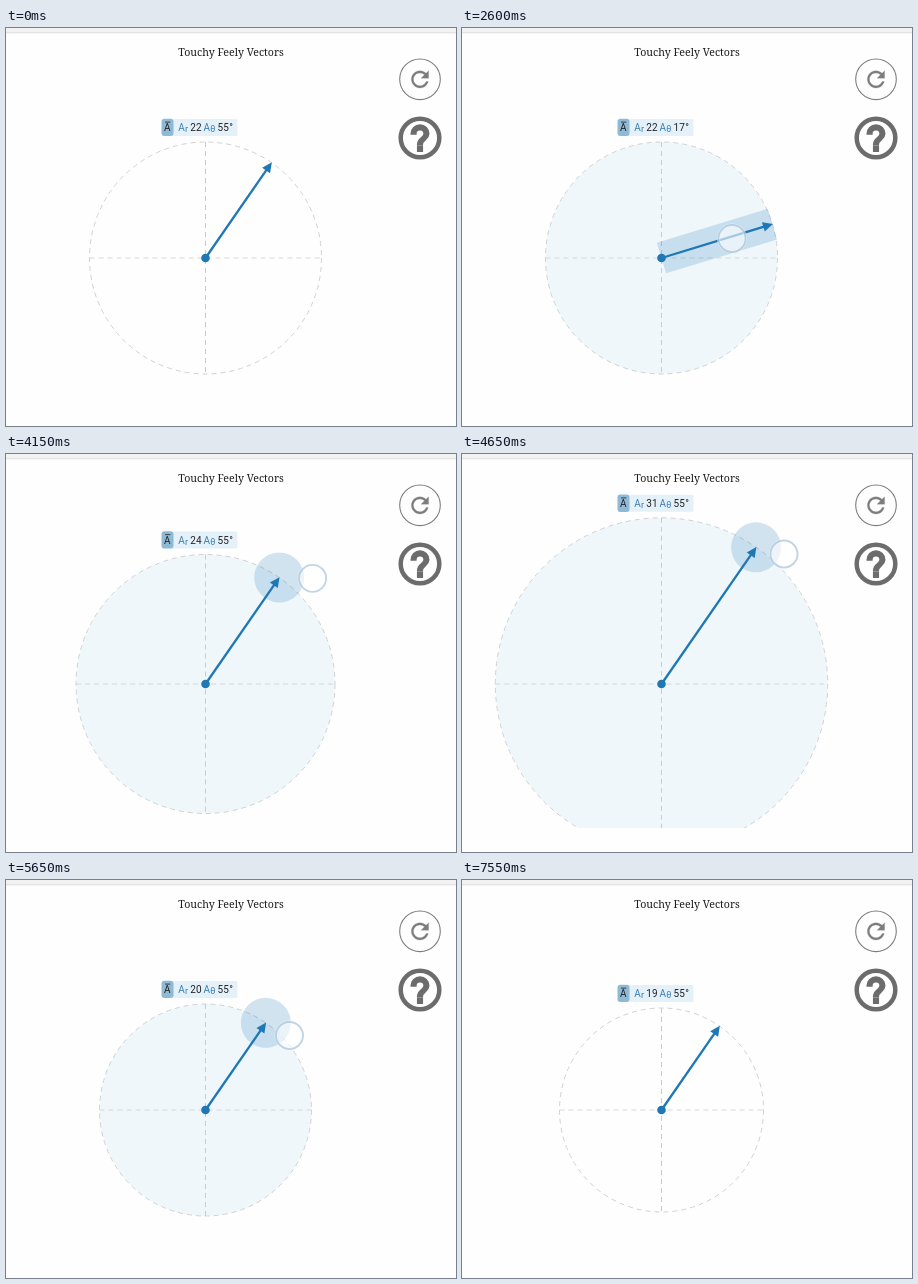
An HTML page that plays this animation: 450x398 px, repeating every 7600 ms.

```html
<!DOCTYPE html>
<html lang="en">
<head>
<meta charset="utf-8">
<title>Touchy Feely Vectors</title>
<style>
  html, body { margin: 0; width: 100%; height: 100%; overflow: hidden; background: #fefefe; }
  svg { display: block; width: 450px; height: 398px; }
  .dash { fill: none; stroke: #ccc; stroke-width: .9; stroke-dasharray: 5 4; }
  .label { font: 10px Roboto, sans-serif; letter-spacing: .15px; fill: #222; }
  .label .sym { fill: #3b7db4; }
  .label .sub { font-size: 9px; }
  .title { font: 10.6px "Noto Serif", serif; fill: #1c1c1c; text-anchor: middle; }
</style>
</head>
<body>
<svg viewBox="0 0 450 398">
  <defs><clipPath id="pad"><rect y="6" width="450" height="368"/></clipPath></defs>
  <rect width="450" height="4.5" fill="#f2f2f2"/>
  <rect y="4.3" width="450" height="1" fill="#dcdcdc"/>
  <text class="title" x="225" y="28">Touchy Feely Vectors</text>

  <g clip-path="url(#pad)">
    <g transform="translate(199.5 230)">
      <circle id="disc" fill="#1f88c4" fill-opacity=".062"/>
      <path id="across" class="dash" style="stroke: #d3d3d3"/>
      <path id="upright" class="dash" style="stroke: #c4c4c4"/>
      <circle id="rim" class="dash"/>
      <g id="spin">
        <g id="glow" fill="#1f77b4" fill-opacity=".2">
          <rect id="rod" y="-16" height="32"/>
          <circle id="tip" r="25"/>
        </g>
        <path id="shaft" stroke="#1f77b4" stroke-width="2.3"/>
        <path id="head" d="M0 0L-10 -4.8V4.8Z" fill="#1f77b4"/>
      </g>
      <circle r="4.3" fill="#1f77b4"/>
    </g>
  </g>

  <g id="label" class="label">
    <rect x="156" y="-8.5" width="75.5" height="17" rx="1.5" fill="#e5f1f9"/>
    <rect x="155.5" y="-8.7" width="12" height="17.4" rx="3" fill="#8fbad5"/>
    <text x="158.1" y="4">A</text>
    <path d="M159 -5.3H164.3" fill="none" stroke="#333" stroke-width=".9"/>
    <text class="sym" x="172.3" y="3.7">A<tspan class="sub" dy="1">r</tspan></text>
    <text id="len" x="184.3" y="3.7"></text>
    <text class="sym" x="197.6" y="3.7">A<tspan class="sub" dy="1">θ</tspan></text>
    <text id="deg" x="211.6" y="3.7"></text>
  </g>

  <g id="touch">
    <circle r="13.5" fill="#fff" fill-opacity=".6" stroke="#fff" stroke-opacity=".5" stroke-width="3"/>
    <circle r="13.5" fill="none" stroke="#86abcc" stroke-opacity=".5" stroke-width="1.9"/>
  </g>

  <circle cx="414" cy="51.3" r="20.3" fill="none" stroke="#7d7d7d" stroke-width="1.1"/>
  <path transform="translate(401 38.4) scale(1.08)" fill="#7d7d7d" stroke="#7d7d7d" stroke-width=".2" d="M17.65 6.35C16.2 4.9 14.21 4 12 4c-4.42 0-7.99 3.58-7.99 8s3.57 8 7.99 8c3.73 0 6.84-2.55 7.73-6h-2.08c-.82 2.33-3.04 4-5.65 4-3.31 0-6-2.69-6-6s2.69-6 6-6c1.66 0 3.14.69 4.22 1.78L13 11h7V4z"/>
  <circle cx="414" cy="110" r="19.3" fill="none" stroke="#6c6c6c" stroke-width="4.5"/>
  <path transform="translate(388.2 84.3) scale(2.15)" fill="#6c6c6c" stroke="#6c6c6c" stroke-width=".85" d="M11 18h2v-2h-2zM12 6c-2.21 0-4 1.79-4 4h2c0-1.1.9-2 2-2s2 .9 2 2c0 2-3 1.75-3 5h2c0-2.25 3-2.5 3-5 0-2.21-1.79-4-4-4z"/>
</svg>
<script>
const LOOP = 7600, STEP = 50, UNIT = 5.33, GRAB_TIP = 3850;

// Each row: time in ms, then values.
const ANGLE = [[1950, 55.3], [2600, 17], [2800, 11.5], [3450, 42], [3830, 55.3]];
const RADIUS = [[3850, 116], [4300, 139.8], [4650, 166.2], [4850, 174.5], [5100, 163], [5650, 106], [5900, 102]];
const TOUCH = [
  [1950, 242, 181], [2600, 270, 210.5], [2800, 271, 215], [3450, 255.5, 168.5],
  [3650, 254, 163], [3850, 291, 144], [4650, 322, 100], [4850, 325.5, 95],
  [5100, 318.5, 105], [5650, 283.5, 155.5], [5900, 282.2, 157.4]
];

const $ = id => document.getElementById(id);
const set = (id, attrs) => {
  for (const name in attrs) $(id).setAttribute(name, attrs[name]);
};

// Smooth curve through the rows, flat at peaks and at both ends.
function track(rows, t, col = 1) {
  const last = rows.length - 1;
  if (t <= rows[0][0]) return rows[0][col];
  if (t >= rows[last][0]) return rows[last][col];
  const slope = i => (rows[i + 1][col] - rows[i][col]) / (rows[i + 1][0] - rows[i][0]);
  const tangent = i => {
    if (i === 0 || i === last) return 0;
    const a = slope(i - 1), b = slope(i);
    return a * b > 0 ? 2 * a * b / (a + b) : 0;
  };
  const i = rows.findIndex(row => row[0] > t) - 1;
  const span = rows[i + 1][0] - rows[i][0];
  const u = (t - rows[i][0]) / span, v = 1 - u;
  return v * v * (1 + 2 * u) * rows[i][col] + u * u * (3 - 2 * u) * rows[i + 1][col]
    + span * u * v * (v * tangent(i) - u * tangent(i + 1));
}

const ramp = (t, start) => Math.min(1, Math.max(0, (t + STEP - start) / 400));

function draw(t) {
  const r = track(RADIUS, t), angle = track(ANGLE, t);
  const shown = ramp(t, 300) - ramp(t, 7200);
  const onTip = t >= GRAB_TIP;

  set("disc", { r, opacity: shown });
  set("rim", { r });
  set("across", { d: `M${-r} 0H${r}` });
  set("upright", { d: `M0 ${-r}V${r}` });
  set("spin", { transform: `rotate(${-angle})` });
  set("glow", { opacity: shown });
  set("rod", { width: r, visibility: onTip ? "hidden" : "visible" });
  set("tip", { cx: r, visibility: onTip ? "visible" : "hidden" });
  set("shaft", { d: `M0 0H${r - 7}` });
  set("head", { transform: `translate(${r + 0.5} 0)` });
  set("label", { transform: `translate(0 ${230 - r - 14.6})` });
  set("touch", { opacity: shown, transform: `translate(${track(TOUCH, t, 1)} ${track(TOUCH, t, 2)})` });
  $("len").textContent = Math.round(r / UNIT);
  $("deg").textContent = Math.round(angle) + "°";
}

const began = performance.now();
function tick() {
  const t = (performance.now() - began) % LOOP;
  draw(Math.floor(t / STEP) * STEP);
  requestAnimationFrame(tick);
}
tick();
</script>
</body>
</html>
```
